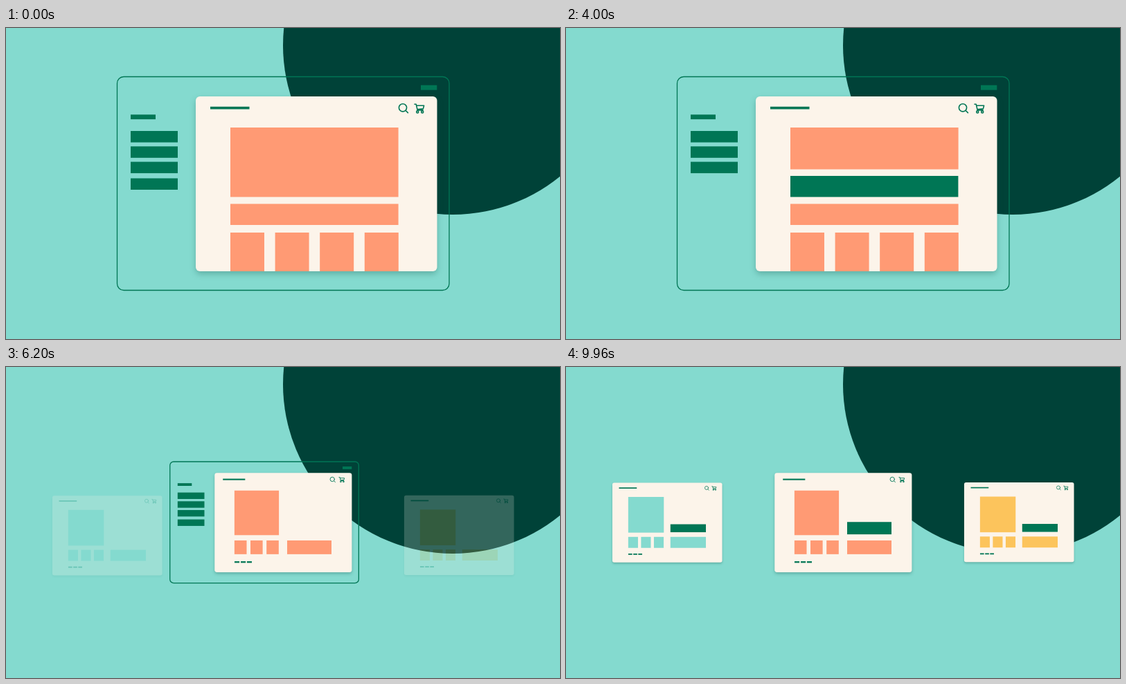
An HTML page for the animation above (10000 ms loop, 800x450 px).

```html
<!DOCTYPE html>
<html lang="en">
<head>
<meta charset="utf-8">
<title>Store layout builder</title>
<style>
  html, body { margin: 0; width: 100%; height: 100%; overflow: hidden; background: #84dacf; }
  svg { display: block; width: 100vw; height: 100vh; }
  .green { fill: #007655; }
  .salmon { fill: #ff9a74; }
  .teal { fill: #84dacf; }
  .yellow { fill: #fcc45c; }
  .paper { fill: #fcf4ea; filter: drop-shadow(0 4px 4px rgba(0, 66, 56, .27)); }
  .icon { fill: none; stroke: #007655; stroke-width: 1.6; stroke-linecap: round; stroke-linejoin: round; }
  .outline { fill: none; stroke: #007655; stroke-width: 1.3; vector-effect: non-scaling-stroke; }
</style>
</head>
<body>
<svg viewBox="0 0 800 450" xmlns="http://www.w3.org/2000/svg">
  <defs>
    <g id="card">
      <rect class="paper" x="274" y="99" width="348.5" height="253" rx="6"/>
      <rect class="green" x="295" y="113.8" width="56.5" height="3.7"/>
      <g class="icon">
        <circle cx="573" cy="115.3" r="5.6"/>
        <path d="M577.2 119.5L580.4 122.6"/>
        <path d="M590 110.3h2.2l2 8.6h7.8M592.6 112.3h11l-1.2 4.6l-8.6 .8"/>
        <circle cx="594.2" cy="121.4" r="1.5"/>
        <circle cx="601.2" cy="121.4" r="1.5"/>
      </g>
    </g>
  </defs>
  <circle cx="645" cy="25" r="245" fill="#004238"/>
  <g id="left"></g>
  <g id="right"></g>
  <g id="main">
    <g id="frame">
      <rect class="outline" x="160.5" y="70.5" width="479.5" height="309" rx="9.5"/>
    </g>
    <use href="#card"/>
  </g>
  <g id="late"></g>
</svg>
<script>
const LOOP = 10000;
const FULL = [1, 0, 0];
const SMALL = [0.5685, 145.5, 96.9];

const $ = id => document.getElementById(id);
const clamp = v => Math.min(1, Math.max(0, v));
const ramp = (t, from, to) => clamp((t - from) / (to - from));
const mix = (a, b, p) => a.map((v, i) => v + (b[i] - v) * p);

// cubic-bezier(.4, 0, .6, 1)
function ease(x) {
  let lo = 0, hi = 1;
  for (let i = 0; i < 24; i++) {
    const u = (lo + hi) / 2, v = 1 - u;
    if (1.2 * u * v * v + 1.8 * u * u * v + u * u * u < x) lo = u; else hi = u;
  }
  return lo * lo * (3 - 2 * lo);
}

function place(el, box) {
  ['x', 'y', 'width', 'height'].forEach((name, i) => el.setAttribute(name, box[i]));
}

function rect(parent, cls, box) {
  const el = document.createElementNS('http://www.w3.org/2000/svg', 'rect');
  el.setAttribute('class', cls);
  place(el, box);
  parent.appendChild(el);
  return el;
}

function pose(el, [s, x, y]) {
  el.setAttribute('transform', `translate(${x} ${y}) scale(${s})`);
}

// Product page layout: picture, thumbnails, text bar, dashes
const picture = [324.3, 144, 113, 113.5];
const thumbs = [324.3, 365, 405.8].map(x => [x, 271, 31, 35]);
const textBar = [458.2, 271, 112.6, 35];
const dashes = [324.5, 340.4, 356].map(x => [x, 324, 12.5, 4]);
const slot = [458.2, 224, 112.6, 31.5];
const tray = [180, 217.5, 68, 16.5];

// Sidebar
const frame = $('frame');
rect(frame, 'green', [599, 82.7, 23.3, 7]);
rect(frame, 'green', [180, 125.3, 36, 6.8]);
[149, 171.3, 193.6].forEach(y => rect(frame, 'green', [180, y, 68, 16.5]));

// Pieces of the main page: the states each one passes through
const main = $('main');
const piece = (cls, ...states) => ({ el: rect(main, cls, states[0]), states });
const column = i => [324 + 64.6 * i, 296, 49, 56];
const pieces = [
  piece('salmon', [324, 144, 242.6, 100.5], [324, 144, 242.6, 60.5], picture),
  piece('salmon', [324, 254.5, 242.6, 30.5], [324, 254.5, 242.6, 30.5], textBar),
  ...thumbs.map((box, i) => piece('salmon', column(i + 1), column(i + 1), box)),
  piece('green', column(0), column(0), dashes[1]),
  piece('salmon', column(0), column(0), dashes[1]),
  piece('green', tray, [324, 214, 242.4, 30.5], dashes[2])
];
const fading = pieces[6].el;

// Parts that appear already in their final place
const late = $('late');
pose(late, SMALL);
const firstDash = rect(late, 'green', dashes[0]);
const newBar = rect(late, 'green', tray);

// Side pages
function sidePage(id, cls, x, y) {
  const el = $(id);
  el.innerHTML = '<use href="#card"/>';
  [picture, ...thumbs, textBar].forEach(box => rect(el, cls, box));
  dashes.forEach(box => rect(el, 'green', box));
  return { el, x, y, bar: rect(el, 'green', [458.2, 230.8, 112.6, 25.4]) };
}
const pages = [
  sidePage('left', 'teal', -57.7, 122.5),
  sidePage('right', 'yellow', 450.3, 122)
];

function draw(t) {
  const insert = ease(ramp(t, 1000, 3000));
  const shrink = ease(ramp(t, 4000, 6000));
  const rearrange = ease(ramp(t, 4160, 6100));
  const drop = ease(ramp(t, 7000, 9000));

  pose(main, mix(FULL, SMALL, shrink));
  for (const { el, states: [a, b, c] } of pieces) {
    place(el, mix(mix(a, b, insert), c, rearrange));
  }
  fading.setAttribute('opacity', 1 - ramp(t, 4500, 5210));

  const arrive = ramp(t, 5400, 5800);
  firstDash.setAttribute('opacity', arrive);
  newBar.setAttribute('opacity', arrive);
  place(newBar, mix(tray, slot, drop));
  frame.setAttribute('opacity', 1 - ramp(t, 8500, 9100));

  const show = ramp(t, 6080, 6690);
  const rise = 20 * (1 - ease(ramp(t, 6080, 6800)));
  for (const { el, x, y, bar } of pages) {
    pose(el, [0.455, x, y + rise]);
    el.setAttribute('opacity', show);
    bar.setAttribute('opacity', ramp(t, 8600, 9200));
  }
}

function tick() {
  draw(performance.now() % LOOP);
  requestAnimationFrame(tick);
}
tick();
</script>
</body>
</html>
```
